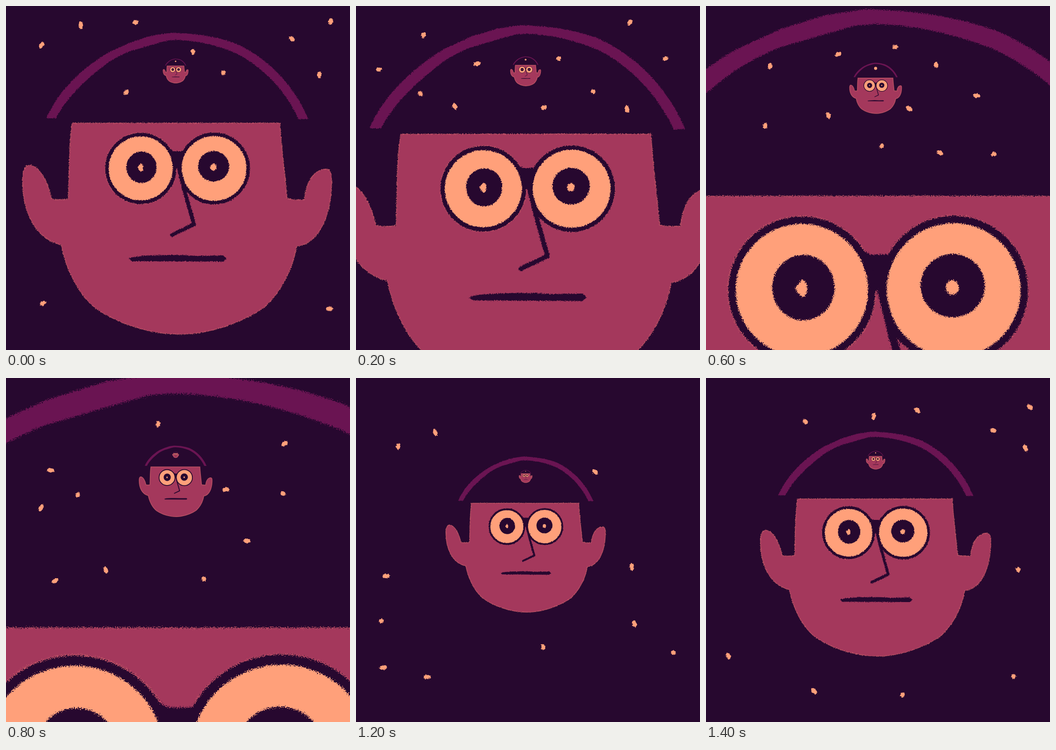
Animation of 720x720 px, one loop 1.6 s. Source, as an HTML page:

```html
<!DOCTYPE html>
<html lang="en">
<head>
<meta charset="utf-8">
<title>Endless head</title>
<style>
  html, body { margin: 0; width: 100%; height: 100%; overflow: hidden; background: #27082f; }
  svg { display: block; width: 100%; height: 100%; }
  .halo { stroke: #d0616c; stroke-opacity: .7; stroke-width: 1.5; vector-effect: non-scaling-stroke; }
  .line { fill: none; stroke: #27082f; stroke-linecap: round; stroke-linejoin: round; }
</style>
</head>
<body>
<svg viewBox="0 0 720 720">
  <defs>
    <filter id="rough" filterUnits="userSpaceOnUse" x="-30" y="-30" width="780" height="780" color-interpolation-filters="sRGB">
      <feTurbulence type="fractalNoise" baseFrequency=".45" numOctaves="2" seed="4"/>
      <feDisplacementMap id="grain" in="SourceGraphic" scale="5" xChannelSelector="R" yChannelSelector="G"/>
    </filter>
    <filter id="speck" filterUnits="userSpaceOnUse" x="-30" y="-30" width="780" height="780" color-interpolation-filters="sRGB">
      <feTurbulence type="fractalNoise" baseFrequency=".3" numOctaves="2" seed="9"/>
      <feDisplacementMap in="SourceGraphic" scale="5" xChannelSelector="R" yChannelSelector="G"/>
    </filter>
    <!-- The head's origin is the middle of the hairline. -->
    <g id="head" transform="translate(-358.5 -245)">
      <path fill="#6a1452" d="M85 235C105 187 150 136 215 97L261 76L306 62L345 56C400 57 440 64 480 78
        C548 108 603 165 633 236L613 237C585 175 535 125 480 98C440 82 400 72 356 71L340 72
        C318 77 285 88 262 94Q238 103 215 118C165 155 125 195 105 235Z"/>
      <path class="halo" fill="#a4385c" d="M139 245H574C577 300 584 350 589 403Q606 407 625 405
        C629 366 646 342 670 341C681 341 683 352 682 376C680 435 658 497 609 503C600 555 574 600 542 630
        C512 652 455 677 405 684C380 688 345 688 315 683C270 675 225 658 190 634C153 606 126 552 116 500
        C62 487 34 432 35 360C36 344 40 333 50 333C72 335 89 370 96 404Q112 407 131 404C133 340 132 290 139 245Z"/>
      <g class="halo" fill="none">
        <circle cx="282.5" cy="340" r="74.5"/>
        <circle cx="436" cy="340" r="75"/>
      </g>
      <path fill="#27082f" d="M334 286Q346 304 353 304H368Q376 303 388 286L370 335L365 346Q359 334 354 346L346 320Z"/>
      <g fill="#ffa07a" stroke="#27082f" stroke-width="7.5">
        <circle cx="282.5" cy="340" r="70.7"/>
        <circle cx="436" cy="340" r="71.5"/>
      </g>
      <g fill="#27082f">
        <ellipse cx="284" cy="337.5" rx="31.5" ry="33"/>
        <ellipse cx="435" cy="335.5" rx="32.5" ry="32"/>
        <path d="M258 529Q264 523 320 521.5Q360 520 400 523L455 522L462 529L455 535L264 534Z"/>
      </g>
      <g fill="#ffa07a">
        <path d="M283 329Q288 332 288 338Q288 346 283 347Q276 342 276 337Z"/>
        <ellipse cx="434.6" cy="337.3" rx="6.7" ry="7.3"/>
      </g>
      <path class="line" stroke-width="8" d="M363 342L375 390L394 457L348 479"/>
    </g>
  </defs>
  <rect width="720" height="720" fill="#27082f"/>
  <g filter="url(#rough)"><use href="#head"/></g>
  <g id="stars" fill="#ffa07a" filter="url(#speck)"></g>
  <use href="#head"/>
  <use href="#head"/>
  <circle id="dot" fill="#ffa07a"/>
</svg>
<script>
const STEP = 200, STEPS = 8, MIDDLE = 355;
const DOT_BELOW = .016;  // heads smaller than this are a single dot

// step, scale and hairline of the largest head; it starts two steps before the loop
const KEYS = [
  [-2, .516, 262], [-1, .745, 253], [0, 1, 245], [2, 1.452, 291],
  [3, 2.07, 398], [4, 2.82, 523], [5, 3.67, 703]
];

const heads = document.querySelectorAll("svg > use, svg > g > use");
const grain = document.getElementById("grain");
const starLayer = document.getElementById("stars");
const dot = document.getElementById("dot");

function set(el, attrs) {
  for (const name in attrs) el.setAttribute(name, attrs[name]);
}

function seeded(seed) {
  return () => {
    seed = (seed * 1664525 + 1013904223) >>> 0;
    return seed / 4294967296;
  };
}

function largestHead(step) {
  const i = KEYS.findIndex(key => key[0] >= step);
  const [s1, scale1, y1] = KEYS[i];
  const [s0, scale0, y0] = KEYS[Math.max(0, i - 1)];
  const u = s1 === s0 ? 1 : (step - s0) / (s1 - s0);
  const scale = scale0 * (scale1 / scale0) ** u;
  return { scale, x: MIDDLE + (scale < 1 ? 0 : 3), y: y0 + (y1 - y0) * u };
}

// The head inside the cap grows a little ahead of its parent at the end.
function innerHead({ scale, y }, step) {
  const ratio = .081 + .016 * (step / 5) ** 8;
  return { scale: scale * ratio, x: MIDDLE, y: y - 119.5 * scale };
}

function covers(head, x, y, margin) {
  const dx = (x - head.x) / head.scale, dy = (y - head.y) / head.scale;
  return Math.hypot(dx / 340, (dy - 127) / 330) < margin;
}

function inCap(head, x, y) {
  const dx = (x - head.x) / head.scale, dy = (y - head.y) / head.scale;
  return dy < -35 && Math.hypot(dx, dy - 109) < 265;
}

// Stars fill the open sky outside the large head and inside its cap.
function scatter(large, small, seed) {
  const random = seeded(seed);
  const stars = [];
  for (let tries = 0; tries < 300 && stars.length < 11; tries++) {
    const x = 40 + 640 * random(), y = 30 + 640 * random();
    const free = (!covers(large, x, y, 1.04) || inCap(large, x, y)) && !covers(small, x, y, 1.25);
    const apart = stars.every(s => Math.hypot(s.x - x, s.y - y) > 75);
    if (free && apart) stars.push({ x, y, tilt: 180 * random(), long: 5 + 3 * random() });
  }
  return stars;
}

function draw(index) {
  const step = index < 6 ? index : index - STEPS;
  const large = largestHead(step);
  const small = innerHead(large, step);
  const tiny = innerHead(small, step);

  [large, small, tiny].forEach(({ scale, x, y }, i) => {
    heads[i].style.display = scale < DOT_BELOW ? "none" : "";
    set(heads[i], { transform: `translate(${x} ${y}) scale(${scale})` });
  });
  set(grain, { scale: 5 * large.scale });
  set(dot, { cx: tiny.x, cy: tiny.y, r: tiny.scale < DOT_BELOW ? 19 * small.scale : 0 });

  starLayer.innerHTML = scatter(large, small, 7919 * (index + 1)).map(({ x, y, tilt, long }) =>
    `<ellipse rx="${long}" ry="4.6" transform="translate(${x} ${y}) rotate(${tilt})"/>`).join("");
}

let shown = -1;
const start = performance.now();

function tick() {
  const index = Math.floor((performance.now() - start) / STEP) % STEPS;
  if (index !== shown) draw(shown = index);
  requestAnimationFrame(tick);
}
tick();
</script>
</body>
</html>
```
